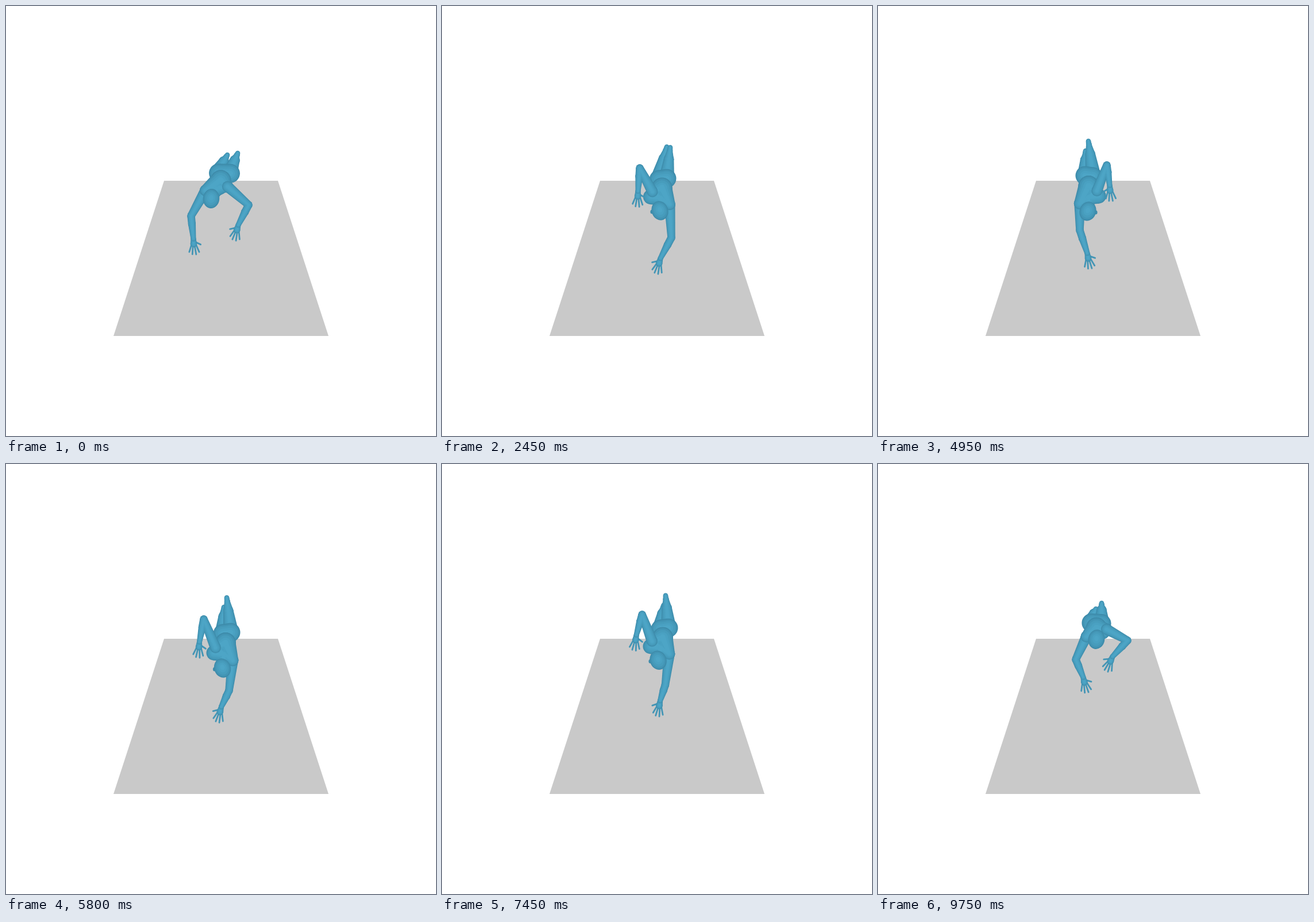
Recreate the animation shown at these times as an HTML page with a canvas. Size 748 by 748 pixels, loop 9.8 s.

```html
<!DOCTYPE html>
<html lang="en">
<head>
<meta charset="utf-8">
<title>Swimmer</title>
<style>
  html, body { margin: 0; width: 100%; height: 100%; overflow: hidden; background: #fff; }
  canvas { display: block; width: 748px; height: 748px; }
</style>
</head>
<body>
<canvas id="stage" width="748" height="748"></canvas>
<script>
const ctx = document.getElementById('stage').getContext('2d');
const LOOP = 9800, STEP = 50, TAU = Math.PI * 2;

// time, stroke phase, then x,y of: head, pelvis, left foot, right foot,
// left elbow, left wrist, right elbow, right wrist
const KEYS = [
  [0, 0.8, 357, 335, 380, 291, 385, 259, 403, 256, 322, 365, 326, 405, 422, 346, 404, 381],
  [2450, 2.5, 379, 356, 384, 301, 391, 245, 397, 246, 344, 282, 341, 322, 399, 403, 380, 439],
  [3800, 3.35, 371, 352, 377, 298, 387, 246, 399, 246, 320, 312, 332, 347, 394, 378, 386, 412],
  [4950, 4, 365, 357, 367, 296, 361, 252, 366, 235, 351, 390, 364, 430, 398, 277, 403, 312],
  [6650, 5, 368, 353, 373, 292, 369, 246, 374, 230, 357, 390, 373, 425, 398, 271, 410, 297],
  [8300, 6, 364, 329, 373, 280, 374, 243, 376, 230, 361, 370, 365, 402, 399, 256, 412, 289],
  [9750, 6.85, 380, 305, 380, 277, 379, 252, 389, 242, 344, 340, 357, 371, 434, 307, 408, 335]
];

// Arm cycle in eighths: elbow and wrist from the head, x outward
const ARM = [
  [33, -80, 42, -42], [48, -48, 58, -8], [42, 10, 42, 50], [28, 38, 18, 76],
  [13, 40, 0, 76], [38, 32, 16, 66], [62, 5, 42, 40], [52, -38, 38, -2]
];

const lerp = (a, b, k) => a + (b - a) * k;
const mix = (a, b, k) => [lerp(a[0], b[0], k), lerp(a[1], b[1], k)];
const add = (p, x, y) => [p[0] + x, p[1] + y];

function armAt(phase) {
  const u = (phase - Math.floor(phase)) * 8, i = Math.floor(u), f = u - i;
  const [a, b, c, d] = [7, 0, 1, 2].map(n => ARM[(i + n) % 8]);
  return b.map((v, n) => v + f / 2 * (c[n] - a[n] +
    f * (2 * a[n] - 5 * v + 4 * c[n] - d[n] + f * (3 * (v - c[n]) + d[n] - a[n]))));
}

function cycle(phase) {
  const sway = -Math.cos(TAU * phase), kick = 4 * Math.sin(3 * TAU * phase);
  const hx = 370 + 5 * sway, hy = 345, px = 376 + 7 * sway;
  const l = armAt(phase + 0.5), r = armAt(phase);
  return [hx, hy, px, 291, px + 2, 247 + kick, px + 10, 245 - kick,
    hx - l[0], hy + l[1], hx - l[2], hy + l[3],
    hx + r[0], hy + r[1], hx + r[2], hy + r[3]];
}

const OFFSETS = KEYS.map(k => cycle(k[1]).map((v, i) => k[i + 2] - v));

function poseAt(t) {
  let i = 0;
  while (i < KEYS.length - 2 && t >= KEYS[i + 1][0]) i++;
  const k = Math.min(1, (t - KEYS[i][0]) / (KEYS[i + 1][0] - KEYS[i][0]));
  const phase = lerp(KEYS[i][1], KEYS[i + 1][1], k);
  const v = cycle(phase).map((c, n) => c + lerp(OFFSETS[i][n], OFFSETS[i + 1][n], k));
  const p = n => [v[2 * n], v[2 * n + 1]];
  return { roll: Math.cos(TAU * phase), head: p(0), pelvis: p(1), feet: [p(2), p(3)],
    elbows: [p(4), p(6)], wrists: [p(5), p(7)] };
}

const SHADES = [[1, '#3e8cab'], [0.88, '#4395b5'], [0.72, '#479cbc'], [0.5, '#4aa1c2'], [0.28, '#4da5c6']];

function disc(p, rx, ry = rx, turn = 0) {
  ctx.beginPath();
  ctx.ellipse(p[0], p[1], rx, ry, turn, 0, TAU);
  ctx.fill();
}

function taper([a, ra], [b, rb], k) {
  const dx = b[0] - a[0], dy = b[1] - a[1], len = Math.hypot(dx, dy) || 1;
  const nx = -dy / len * k, ny = dx / len * k;
  ctx.beginPath();
  ctx.moveTo(a[0] + nx * ra, a[1] + ny * ra);
  ctx.lineTo(b[0] + nx * rb, b[1] + ny * rb);
  ctx.lineTo(b[0] - nx * rb, b[1] - ny * rb);
  ctx.lineTo(a[0] - nx * ra, a[1] - ny * ra);
  ctx.fill();
  disc(a, ra * k);
  disc(b, rb * k);
}

// Each chain is a row of [point, radius], shaded from edge to middle
function solid(...chains) {
  for (const [k, color] of SHADES) {
    ctx.fillStyle = color;
    for (const c of chains) for (let i = 1; i < c.length; i++) taper(c[i - 1], c[i], k);
  }
}

function hand(elbow, wrist, side) {
  const dx = wrist[0] - elbow[0], dy = wrist[1] - elbow[1], len = Math.hypot(dx, dy) || 1;
  const dir = Math.atan2(dy / len + 0.8, dx / len);
  const out = (r, turn) => add(wrist, r * Math.cos(dir + turn), r * Math.sin(dir + turn));
  const palm = out(9, 0);
  ctx.lineCap = 'round';
  ctx.strokeStyle = '#4395b5';
  ctx.lineWidth = 2.8;
  ctx.beginPath();
  [[25, -0.36], [27.5, -0.12], [27, 0.12], [24, 0.36]].forEach(([r, turn]) => {
    ctx.moveTo(...out(10, turn));
    ctx.lineTo(...out(r, turn));
  });
  ctx.moveTo(...out(4, 0));
  ctx.lineTo(...out(16, side * 0.85));
  ctx.stroke();
  solid([[wrist, 4.5], [palm, 5.8]]);
}

function arm(pose, shoulders, i) {
  const elbow = pose.elbows[i], wrist = pose.wrists[i];
  hand(elbow, wrist, i ? 1 : -1);
  solid([[shoulders[i], 9.5], [elbow, 6.7], [mix(elbow, wrist, 0.35), 6.6], [wrist, 4.5]]);
}

function draw(t) {
  ctx.fillStyle = '#fff';
  ctx.fillRect(0, 0, 748, 748);
  ctx.fillStyle = '#c9c9c9';
  ctx.beginPath();
  [[275, 304], [473, 304], [561, 574], [187, 574]].forEach(p => ctx.lineTo(...p));
  ctx.fill();

  const pose = poseAt(t), { roll, head, pelvis } = pose, turn = Math.abs(roll);
  const chest = mix(pelvis, head, 0.6), waist = mix(pelvis, head, 0.28);
  const sx = 21 - 6 * turn, sy = -11 * roll;
  const shoulders = [add(chest, -sx, -sy), add(chest, sx, sy)];
  const hip = 12 - 5 * turn;
  const up = roll > 0 ? 1 : 0;

  pose.feet.forEach((foot, i) => {
    const top = add(pelvis, i ? hip : -hip, -4);
    solid([[top, 13], [mix(top, foot, 0.6), 8.8], [mix(top, foot, 0.88), 5], [foot, 4.3]]);
  });
  solid([[add(pelvis, -hip, -roll), 16.5], [add(pelvis, hip, roll), 16.5]]);

  arm(pose, shoulders, 1 - up);
  const rib = add(chest, 18 * roll, -2);
  solid([[chest, 13], [rib, 13]],
    [[waist, 18], [shoulders[0], 10]], [[waist, 18], [shoulders[1], 10]],
    [[shoulders[0], 10], [shoulders[1], 10]], [[chest, 13], [head, 9]]);
  arm(pose, shoulders, up);

  ctx.fillStyle = '#3e8cab';
  disc(add(head, 14 * roll, 2), 2.6, 3.5);
  for (const [k, color] of SHADES) {
    ctx.fillStyle = color;
    disc(add(head, 0, -2 * (1 - k)), 14.3 * k, 17 * k, 0.35 * roll);
  }
}

const start = performance.now();
function tick() {
  const t = (performance.now() - start) % LOOP;
  draw(Math.floor(t / STEP) * STEP);
  requestAnimationFrame(tick);
}
tick();
</script>
</body>
</html>
```
